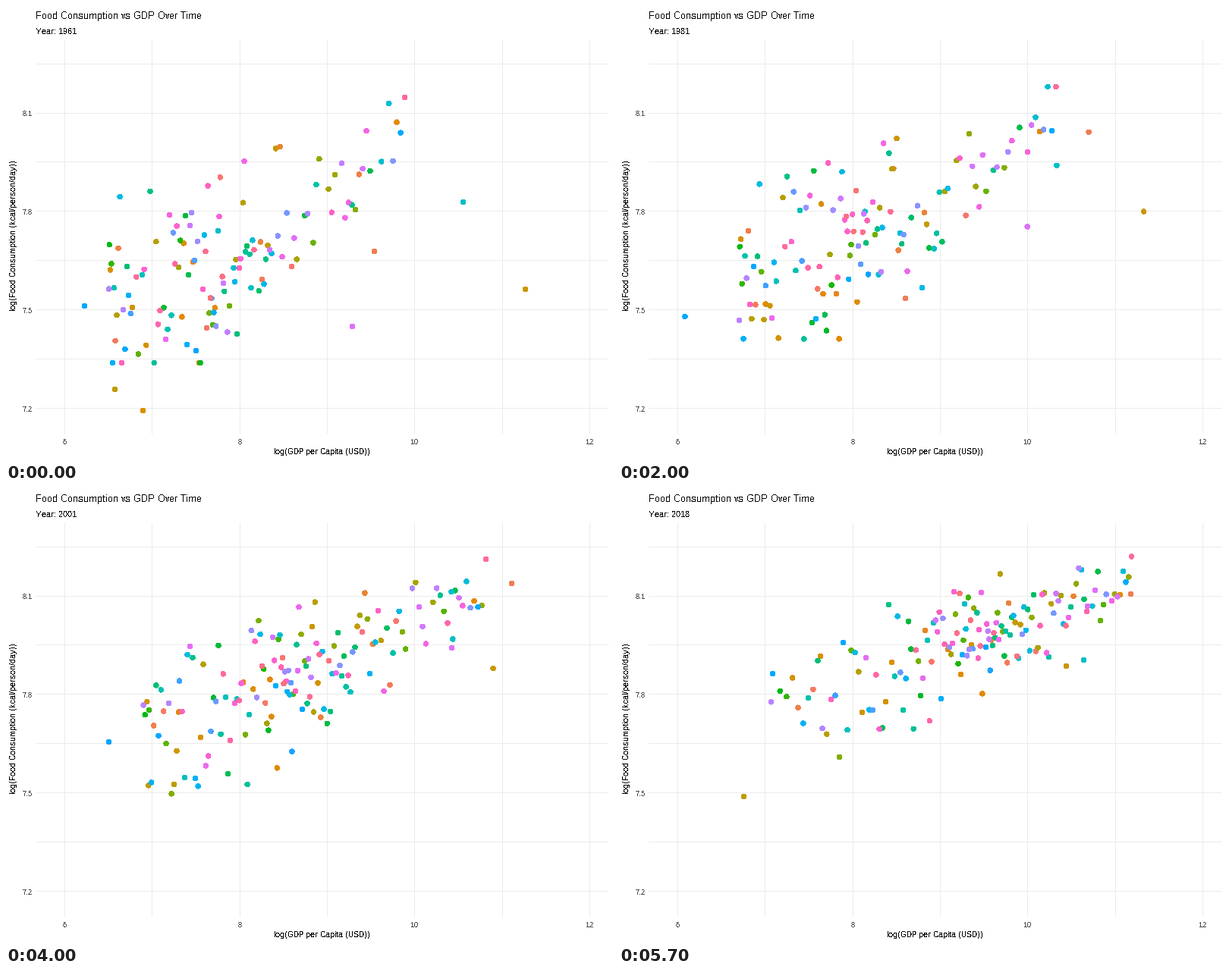
These frames come from a looping animation (800 by 600 pixels, 5800 ms). A matplotlib script:

```python
import matplotlib.pyplot as plt
import numpy as np
from matplotlib.animation import FuncAnimation

W, H, DPI = 800, 600, 100
YEARS = 58
COUNT = 155
PT = 72 / DPI  # points per pixel

# Countries apart from the crowd: place in the colour order -> early, middle, late.
OUTLIERS = {
    0.025: [(485, 323), (657, 110), (674, 138)],
    0.09: [(180, 533), (197, 350), (265, 220)],
    0.13: [(684, 373), (692, 231), (589, 233)],
    0.155: [(143, 505), (204, 386), (164, 405)],
    0.50: [(602, 258), (569, 195), (612, 225)],
    0.635: [(103, 395), (86, 414), (202, 243)],
    0.78: [(456, 422), (563, 248), (617, 154)],
}


def mix(a, b, s):
    return a + (b - a) * s


def hcl(hue, chroma=100, light=65):
    """Polar LUV colour to sRGB."""
    a = np.radians(hue)
    y = ((light + 16) / 116) ** 3
    u = chroma * np.cos(a) / (13 * light) + 0.1978
    v = chroma * np.sin(a) / (13 * light) + 0.4683
    x = 9 * y * u / (4 * v)
    z = -x / 3 - 5 * y + 3 * y / v
    rgb = np.array([
        3.2405 * x - 1.5371 * y - 0.4985 * z,
        -0.9693 * x + 1.8760 * y + 0.0416 * z,
        0.0556 * x - 0.2040 * y + 1.0573 * z,
    ])
    low = 12.92 * rgb
    high = 1.055 * np.maximum(rgb, 0.003) ** (1 / 2.4) - 0.055
    return np.clip(np.where(rgb <= 0.00304, low, high), 0, 1)


def drift(rng, keep):
    """Slow mean-reverting walk, one column per country."""
    walk = rng.normal(size=(YEARS, COUNT))
    for t in range(1, YEARS):
        walk[t] = keep * walk[t - 1] + np.sqrt(1 - keep**2) * walk[t]
    return walk


def crowd(s, rank, diet):
    """Positions at loop fraction s, from wealth rank (0..1) and diet score."""
    bell = rank + 0.08 * np.sin(2 * np.pi * rank)
    q = bell ** (1.35 - 0.55 * s**3)
    x = mix(mix(135, 200, s), mix(530, 675, s), q)
    trend = mix(400, 312, s) - mix(235, 192, s) * q ** mix(1.6, 0.9, s)
    spread = mix(74, 48, s) * (1 - 0.6 * q**2)
    y = np.clip(trend + diet * spread, mix(120, 80, s), mix(470, 380, s))
    return np.column_stack([x, y])


def build_paths():
    rng = np.random.default_rng(1961)
    wealth = drift(rng, 0.999)
    diet = np.clip(drift(rng, 0.985), -2, 2)
    late = rng.choice(COUNT, 27, replace=False)
    jitter = rng.normal(size=(YEARS, COUNT, 2)) * (2, 4)

    pos = np.empty((YEARS, COUNT, 2))
    for t in range(YEARS):
        rank = wealth[t].argsort().argsort() / (COUNT - 1)
        pos[t] = crowd(t / (YEARS - 1), rank, diet[t])
    pos[:31, late] = np.nan  # countries founded around 1992

    years = np.arange(YEARS)
    for place, path in OUTLIERS.items():
        i = round(place * COUNT)
        for axis, stops in enumerate(zip(*path)):
            pos[:, i, axis] = np.interp(years, [0, 26, 57], stops)
        pos[1:-1, i] += jitter[1:-1, i]
    return pos + 0.5


def px(value):
    return 77 + (value - 6) * 115.33


def py(value):
    return 140.5 - (value - 8.1) * 433.33


# Full hinting at whole pixel sizes keeps the lettering crisp.
plt.rcParams.update({
    "font.family": "Liberation Sans",
    "text.hinting": "native",
    "text.hinting_factor": 1,
})
fig = plt.figure(figsize=(W / DPI, H / DPI), dpi=DPI, facecolor="white")
ax = fig.add_axes([0, 0, 1, 1])
ax.set(xlim=(0, W), ylim=(H, 0))
ax.axis("off")


def label(x, y, text, size, color="black", **kw):
    return ax.text(x, y, text, fontsize=size * PT, color=color,
                   antialiased=False, **kw)


grid = dict(color="#EBEBEB", lw=PT, solid_capstyle="butt", zorder=1)
for v in range(6, 13):
    ax.plot([px(v)] * 2, [44, 564], **grid)
    if v % 2 == 0:
        label(px(v), 578, str(v), 9, "#4D4D4D", ha="center")
for k in range(8):
    v = 7.2 + 0.15 * k
    ax.plot([39, 794], [py(v)] * 2, **grid)
    if k % 2 == 0:
        label(34.5, py(v) + 4.5, f"{v:.1f}", 9, "#4D4D4D", ha="right")

label(39, 17, "Food Consumption vs GDP Over Time", 13)
year = label(39, 37, "", 11)
label(416.5, 591, "log(GDP per Capita (USD))", 11, ha="center")
label(15, 302, "log(Food Consumption (kcal/person/day))", 11,
      rotation=90, ha="right", va="center")

paths = build_paths()
colors = [hcl(15 + 360 * i / COUNT) for i in range(COUNT)]
dots = ax.scatter(paths[0, :, 0], paths[0, :, 1], s=(6.5 * PT) ** 2, c=colors,
                  linewidths=0, antialiased=False, zorder=2)


def update(t):
    dots.set_offsets(paths[t])
    year.set_text(f"Year: {1961 + t}")
    return dots, year


anim = FuncAnimation(fig, update, frames=YEARS, interval=100,
                     repeat=True, repeat_delay=0)
plt.show()
```
